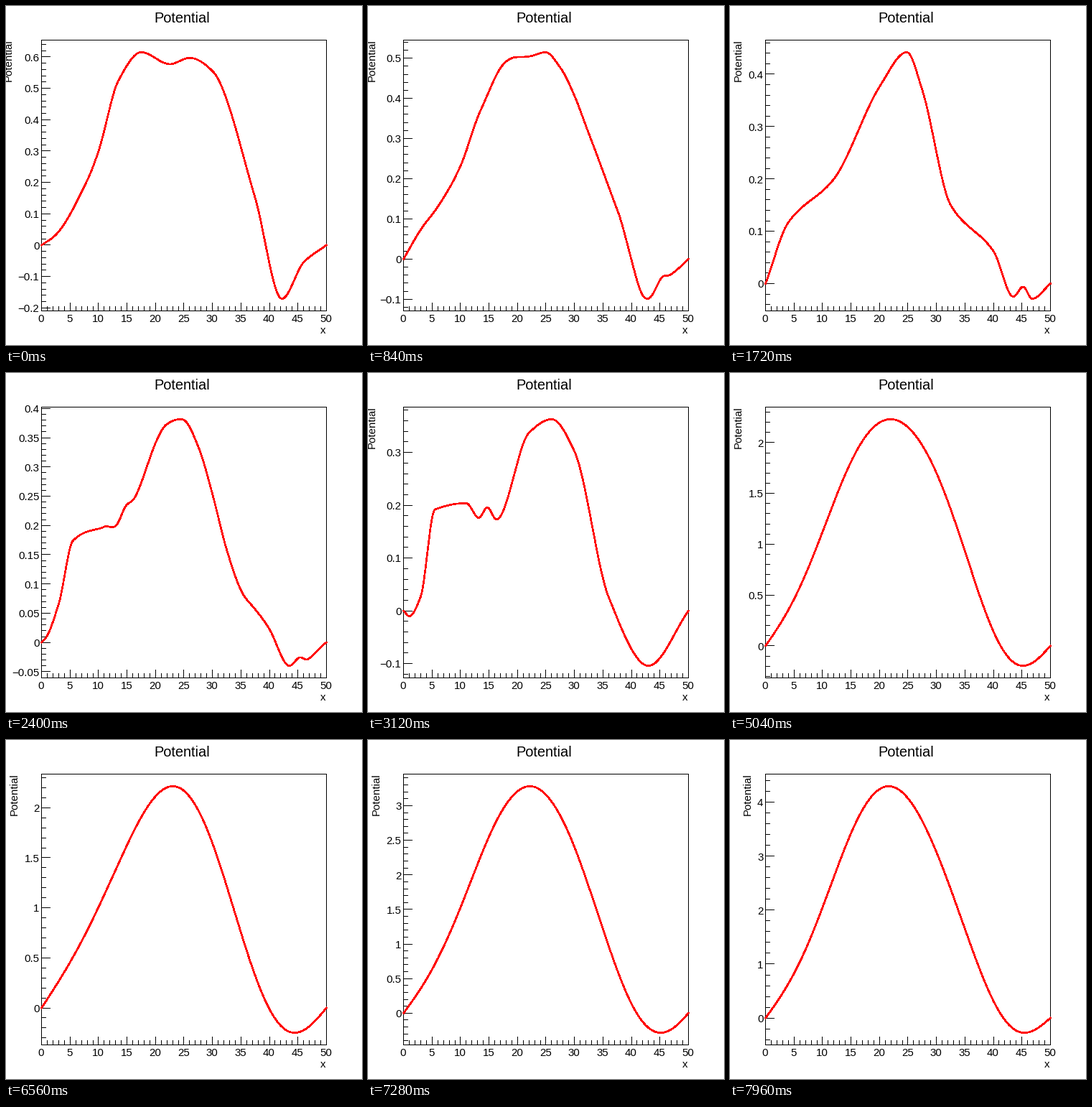
A matplotlib script that plays this animation: 496x472 px, repeating every 8000 ms.

```python
import math

import numpy as np
import matplotlib.pyplot as plt
from matplotlib.animation import FuncAnimation
from matplotlib.collections import LineCollection

W, H, DPI = 496, 472, 64
FRAMES, STEP_MS = 200, 40
LEFT, RIGHT, TOP, BOTTOM = 49.6, 446.4, 47.2, 424.8
LABEL_PX, TITLE_PX = 15, 20
X_MAX = 50

plt.rcParams["font.family"] = "Liberation Sans"

xs = np.linspace(0, X_MAX, 251)


def pt(px):
    return px * 72 / DPI


def sines(*amps):
    """Sum of standing waves that vanish at both ends."""
    k = np.arange(1, len(amps) + 1)
    return np.array(amps) @ np.sin(np.outer(k, xs) * math.pi / X_MAX)


def through(*knots):
    """Monotone cubic through a few turning points, zero at both ends."""
    x, v = np.array([(0, 0), *knots, (X_MAX, 0)], float).T
    h = np.diff(x)
    d = np.diff(v) / h
    a, b = d[:-1], d[1:]
    same = a * b > 0
    mid = np.where(same, 2 * a * b / np.where(same, a + b, 1), 0)
    m = np.concatenate(([d[0]], mid, [d[-1]]))
    i = np.clip(np.searchsorted(x, xs, side="right") - 1, 0, len(h) - 1)
    t = (xs - x[i]) / h[i]
    ease = t * t * (3 - 2 * t)
    bend = t * (1 - t) * ((1 - t) * m[i] - t * m[i + 1]) * h[i]
    return v[i] + (v[i + 1] - v[i]) * ease + bend


# Noisy early states settle into a few growing waves.
states = {
    0: through((2.5, .033), (8, .206), (10, .3), (13.5, .525), (17.5, .615),
               (22.5, .577), (26, .597), (30, .555), (37.5, .15), (42.2, -.171),
               (46, -.055)),
    43: through((4, .117), (12, .2), (20, .376), (24.8, .442), (27.5, .37),
                (32.5, .15), (40, .062), (43.5, -.025), (45.2, -.006), (46.8, -.029)),
    78: through((1, -.01), (3, .027), (5.5, .192), (11, .204), (13.2, .176),
                (14.7, .196), (16.3, .173), (22, .337), (26, .363), (30, .302),
                (36, .026), (43, -.104)),
    98: sines(.962, .294, -.264, .019, -.02, 0, -.01),
    126: sines(1.78, .49, -.436, .042, -.065),
    164: sines(1.664, .498, -.505, .061),
    199: sines(3.34, .934, -.82, -.018, -.089, .018),
}
times = list(states)

rng = np.random.default_rng(4)
modes = np.arange(3, 15)
waves = np.sin(np.outer(modes, xs) * math.pi / X_MAX) * (.2 / modes**2)[:, None]
speed = rng.uniform(.15, .4, len(modes))
phase = rng.uniform(0, 2 * math.pi, len(modes))


def potential(frame):
    k = min(np.searchsorted(times, frame, side="right") - 1, len(times) - 2)
    t0, t1 = times[k], times[k + 1]
    u = (frame - t0) / (t1 - t0)
    ripple = np.cos(speed * frame + phase) @ waves
    return (1 - u) * states[t0] + u * states[t1] + math.sin(math.pi * u) * ripple


def nice(width):
    power = 10 ** math.floor(math.log10(width))
    return next(m * power for m in (1, 2, 5, 10) if width <= m * power * (1 + 1e-9))


def x_px(x):
    return LEFT + (RIGHT - LEFT) * x / X_MAX


def snap(p):
    # Just under the pixel centre, so the renderer keeps this pixel.
    return math.floor(p) + .3


def text_width(label):
    em = sum({".": .278, "\u2212": .584}.get(c, .556) for c in label)
    return em * LABEL_PX - (2 if label.endswith("1") else 0)


fig = plt.figure(figsize=(W / DPI, H / DPI), dpi=DPI, facecolor="white")
ax = fig.add_axes([0, 0, 1, 1])
ax.set_xlim(0, W)
ax.set_ylim(H, 0)
ax.axis("off")


def put(x, y, s, size=LABEL_PX, ha="center", **kw):
    return ax.text(x, y, s, fontsize=pt(size), ha=ha, va="baseline", color="black", **kw)


def thin_lines(segments):
    lines = LineCollection(segments, colors="black", linewidths=pt(1),
                           antialiaseds=False, capstyle="projecting", zorder=2)
    ax.add_collection(lines, autolim=False)
    return lines


x0, x1, y0, y1 = (snap(p) for p in (LEFT, RIGHT, TOP, BOTTOM))
thin_lines([[(x0, y0), (x1, y0), (x1, y1), (x0, y1), (x0, y0)]])
thin_lines([[(snap(x_px(n)), y1), (snap(x_px(n)), y1 - (6 if n % 5 else 11))]
            for n in range(X_MAX + 1)])
for n in range(0, X_MAX + 1, 5):
    put(x_px(n) - .6, 440.5, str(n))
put(245.4, 23, "Potential", TITLE_PX)
put(445.4, 456, "x", ha="right")

y_title = put(16, TOP - 1, "Potential", ha="right", rotation=90, rotation_mode="anchor")
y_ticks = thin_lines([])
y_labels = [put(46.4, 0, "", ha="right") for _ in range(14)]
curve, = ax.plot([], [], color="red", lw=pt(1.6), antialiased=False,
                 solid_joinstyle="round", zorder=3)


def draw(frame):
    v = potential(frame)
    pad = .05 * (v.max() - v.min())
    low, high = v.min() - pad, v.max() + pad
    scale = (BOTTOM - TOP) / (high - low)
    curve.set_data(x_px(xs), BOTTOM - (v - low) * scale)

    step = nice((high - low) / 10)
    minor = nice(step / 5)
    per = round(step / minor)
    segments, marks = [], []
    for n in range(math.ceil(low / minor), math.floor(high / minor) + 1):
        y = BOTTOM - (n * minor - low) * scale
        major = n % per == 0
        segments.append([(x0, snap(y)), (x0 + (12 if major else 6), snap(y))])
        if major:
            marks.append((y, f"{round(n * minor, 6):g}".replace("-", "\u2212")))
    y_ticks.set_segments(segments)

    for i, label in enumerate(y_labels):
        y, s = marks[i] if i < len(marks) else (0, "")
        label.set_text(s)
        label.set_y(y + 5.8)
    y_title.set_x(37 - max(text_width(s) for _, s in marks))
    return [curve, y_ticks, y_title, *y_labels]


anim = FuncAnimation(fig, draw, frames=FRAMES, interval=STEP_MS,
                     init_func=lambda: draw(0), repeat=True, repeat_delay=0)
plt.show()
```
